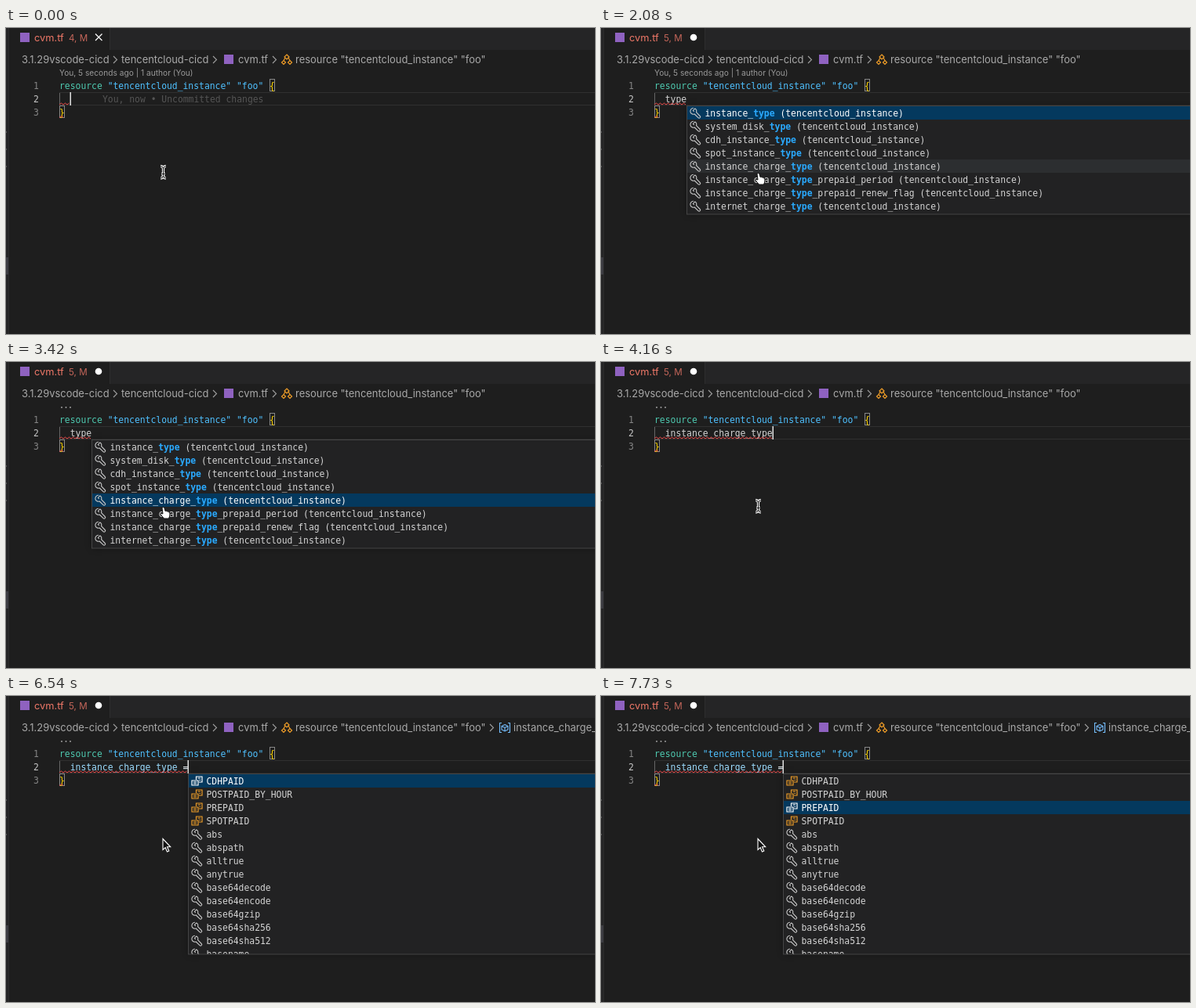
An HTML page with a canvas that plays this animation: 751x391 px, repeating every 8 s.

```html
<!DOCTYPE html>
<html lang="en">
<head>
<meta charset="utf-8">
<title>Editor completion</title>
<style>
  html, body { margin: 0; width: 100%; height: 100%; overflow: hidden; background: #1e1e1e; }
  canvas { display: block; }
</style>
</head>
<body>
<canvas width="751" height="391"></canvas>
<script>
const ctx = document.querySelector('canvas').getContext('2d');
const LOOP = 8000, LEFT = 68, CHAR = 6.85, ROW = 17;
const MONO = '11.38px "DejaVu Sans Mono", monospace';
const UI = 'Inter, sans-serif';
const ORANGE = '#ee9d28', RED = '#f14c4c', PURPLE = '#8f62c0';

const attributes = [
  'instance_type', 'system_disk_type', 'cdh_instance_type', 'spot_instance_type',
  'instance_charge_type', 'instance_charge_type_prepaid_period',
  'instance_charge_type_prepaid_renew_flag', 'internet_charge_type'
];
const broadAttributes = ['tags', ...attributes, 'allocate_public_ip', 'availability_zone',
  'data_disks', 'disable_monitor_service', 'security_groups'];
const values = ['CDHPAID', 'POSTPAID_BY_HOUR', 'PREPAID', 'SPOTPAID', 'abs', 'abspath', 'alltrue',
  'anytrue', 'base64decode', 'base64encode', 'base64gzip', 'base64sha256', 'base64sha512', 'basename'];

// Each entry lists only what changes at that moment.
const timeline = [
  [0, { text: '', caret: true, dirty: false, errors: 4, blame: true, lens: true,
        list: null, selected: 0, mouse: 'beam', fieldCrumb: false }],
  [600, { text: 't', dirty: true, blame: false }],
  [750, { list: broadAttributes }],
  [890, { text: 'ty', list: attributes, errors: 5 }],
  [1040, { mouse: 'hand' }],
  [1340, { text: 'typ' }],
  [1480, { text: 'type' }],
  [2080, { caret: false }],
  [2380, { lens: false }],
  [2530, { caret: true }],
  [2680, { selected: 1 }],
  [2980, { selected: 2, caret: false }],
  [3120, { selected: 3 }],
  [3420, { selected: 4 }],
  [3560, { caret: true }],
  [4010, { text: 'instance_charge_type', list: null, selected: 0 }],
  [4160, { mouse: 'beam' }],
  [4610, { text: 'instance_charge_type ' }],
  [5060, { caret: false }],
  [5500, { text: 'instance_charge_type =', caret: true }],
  [5650, { list: values, mouse: 'arrow' }],
  [6100, { fieldCrumb: true, caret: false }],
  [6540, { caret: true }],
  [6690, { selected: 1 }],
  [6840, { selected: 2 }],
  [6990, { caret: false }],
  [7140, { selected: 3 }],
  [7590, { caret: true }],
  [7730, { selected: 2 }]
];
const stateAt = time => Object.assign({}, ...timeline.filter(([t]) => t <= time).map(([, s]) => s));

function rect(x, y, w, h, color) {
  ctx.fillStyle = color;
  ctx.fillRect(x, y, w, h);
}
function label(text, x, y, color, font = MONO) {
  ctx.font = font;
  ctx.fillStyle = color;
  ctx.fillText(text, x, y);
}
function stroke(path, color, width = 1) {
  ctx.strokeStyle = color;
  ctx.lineWidth = width;
  ctx.stroke(new Path2D(path));
}
function at(x, y, draw) {
  ctx.save();
  ctx.translate(x, y);
  draw();
  ctx.restore();
}
function dot(x, y, r, color) {
  ctx.fillStyle = color;
  ctx.beginPath();
  ctx.arc(x, y, r, 0, 2 * Math.PI);
  ctx.fill();
}

function squiggle(from, to, y) {
  let path = `M${from} ${y}`;
  for (let x = from + 2.5, up = true; x <= to; x += 2.5, up = !up) path += `L${x} ${up ? y - 2 : y}`;
  stroke(path, RED);
}
const chevron = x => stroke(`M${x - 2} 36l4.5 4.5l-4.5 4.5`, '#a0a0a0', 1.1);

function wrench(x, y) {
  at(x, y, () => stroke('M-2-6.2A4 4 0 0 0-6-1.2A4 4 0 0 0-.8 1.5L4 6.2A1.4 1.4 0 0 0 6.2 4' +
    'L1.5-.8A4 4 0 0 0-.2-5.6L-2.6-3.1L-1.2-1.5', '#c5c5c5', 1.1));
}
function enumIcon(x, y, color) {
  at(x, y, () => stroke('M-1-1.5V-5.5H6.5V1.5H2.5M1-3.5H4.5M3-1H4.5M-6.5-.5H1.5V5.5H-6.5Z' +
    'M-4.5 1.5H-.5M-4.5 3.5H-.5', color, 1.2));
}
function classIcon(x, y) {
  at(x, y, () => stroke('M0-6.5L3-3.5L0-.5L-3-3.5ZM-4 1L-1.5 3.5L-4 6L-6.5 3.5Z' +
    'M4 1L6.5 3.5L4 6L1.5 3.5ZM-2-2.5L-4 1M2-2.5L4 1', ORANGE, 1.2));
}
function fieldIcon(x, y) {
  at(x, y, () => stroke('M-4-6H-6.5V6H-4M4-6H6.5V6H4M0-4L4-2V2.5L0 4.5L-4 2.5V-2ZM-4-2L0 0L4-2M0 0V4.5',
    '#75beff', 1.1));
}

const mice = {
  beam() {
    const shape = 'M197 176.5Q200.5 176.5 200.5 180V188.5Q200.5 192 197 192' +
      'M204 176.5Q200.5 176.5 200.5 180M200.5 188.5Q200.5 192 204 192M198 186.5H203';
    stroke(shape, '#fff', 3.2);
    stroke(shape, '#111', 1);
  },
  hand() {
    const shape = new Path2D('M199 186.5Q200.5 184.5 202 186.5L203 190.5Q204.5 189.5 205.2 191Q207 190 207.5 192' +
      'Q209 191.5 209 194Q209 197 207.5 200H201.5Q199 197 197 194.5Q197 192.5 200 194Z');
    ctx.fillStyle = '#fff';
    ctx.fill(shape);
    stroke(shape, '#111');
  },
  arrow() {
    const shape = new Path2D('M200 182.5V196.5L203.2 193.7L205.5 199L207.8 198L205.5 192.8H209.7Z');
    ctx.fillStyle = '#111';
    ctx.fill(shape);
    stroke(shape, '#fff', 1.1);
  }
};

function header(s) {
  rect(133, 0, 618, 28, '#252526');
  rect(132, 0, 1, 28, '#2d2d2d');
  rect(18, 6, 12, 12, PURPLE);
  label('cvm.tf', 36, 17, '#ef7868', `12.8px ${UI}`);
  label(`${s.errors}, M`, 80, 16.5, '#c5665a', `11.6px ${UI}`);
  if (s.dirty) dot(118, 12, 4.3, '#fff');
  else stroke('M114 7.5l8.5 8.5M122.5 7.5l-8.5 8.5', '#fff', 1.2);

  const crumb = (text, x) => label(text, x, 45, '#a9a9a9', `12.93px ${UI}`);
  crumb('3.1.29vscode-cicd', 20);
  crumb('tencentcloud-cicd', 147);
  crumb('cvm.tf', 296);
  crumb('resource "tencentcloud_instance" "foo"', 369);
  [139, 266, 342].forEach(chevron);
  rect(278, 34, 12, 12, PURPLE);
  classIcon(358, 40.5);
  if (s.fieldCrumb) {
    chevron(619);
    fieldIcon(636, 40.5);
    crumb('instance_charge_type', 647);
  }
}

function brace(char, x, y) {
  ctx.strokeStyle = '#888';
  ctx.lineWidth = 1;
  ctx.strokeRect(x + .5, y - 11.5, 6, 15);
  label(char, x, y + .5, '#ffd700');
}

function editor(s, caretX) {
  rect(0, 0, 3, 391, '#252526');
  rect(3, 0, 1, 391, '#2b2b2b');
  rect(0, 293, 3, 22, '#3c3c42');
  [132, 154, 176].forEach(y => rect(0, y, 1, 2, '#555'));

  if (s.lens) label('You, 5 seconds ago | 1 author (You)', LEFT, 61, '#999', `10.2px ${UI}`);
  else [71, 76.5, 82].forEach(x => dot(x, 58, .9, '#aaa'));

  rect(LEFT, 82, 683, 1, '#303030');
  rect(LEFT, 98, 683, 1, '#303030');
  rect(LEFT, 83, 1, 15, '#666');
  [1, 2, 3].forEach(n => label(n, 35, 60.5 + n * ROW, n === 2 ? '#c6c6c6' : '#858585'));

  label('resource', LEFT, 77.5, '#4ec9b0');
  label('"tencentcloud_instance" "foo"', LEFT + 9 * CHAR, 77.5, '#4fc1ff');
  brace('{', 336, 77);
  brace('}', LEFT, 111);
  squiggle(LEFT, LEFT + 7, 114.5);

  const assigned = s.text.endsWith('=');
  label(s.text, LEFT + 2 * CHAR, 94.5, assigned ? '#9cdcfe' : '#d4d4d4');
  if (assigned) label('=', caretX - CHAR, 94.5, '#d4d4d4');
  if (s.blame) label('You, now • Uncommitted changes', 123, 94.5, '#555');
  squiggle(LEFT, caretX, 98);
  if (s.caret) rect(Math.round(caretX) - .5, 82, 1.5, 17, '#e0e0e0');
}

function attributeRow(name, query, x, y, color) {
  const start = name.search(/(?<![a-z])t/);
  const from = Math.max(start, 0);
  const to = start < 0 ? 0 : start + query.length;
  label(name.slice(0, from), x, y, color);
  label(name.slice(from, to), x + from * CHAR, y, '#2aaaff', `bold ${MONO}`);
  label(name.slice(to) + ' (tencentcloud_instance)', x + to * CHAR, y, color);
}

function popup(s, caretX) {
  const left = Math.round(caretX) + .5, top = 99.5;
  const height = Math.min(s.list.length * ROW + 2.5, 230.5);
  ctx.save();
  ctx.shadowColor = 'rgba(0,0,0,.4)';
  ctx.shadowBlur = 8;
  rect(left, top, 700, height, '#222223');
  ctx.restore();

  ctx.save();
  ctx.beginPath();
  ctx.rect(left, top, 700, height);
  ctx.clip();
  s.list.forEach((name, i) => {
    const middle = 108.5 + i * ROW, active = i === s.selected;
    if (active) rect(left, middle - 8.5, 700, ROW, '#04395e');
    else if (i === 4 && s.mouse === 'hand') rect(left, middle - 8.5, 700, ROW, '#2c2e30');
    const color = active ? '#fff' : '#d4d4d4', x = left + 23;
    if (s.list === values && i < 4) enumIcon(left + 11, middle, active ? '#fff' : ORANGE);
    else wrench(left + 10.5, middle);
    if (s.list === values) label(name, x, middle + 4, color);
    else attributeRow(name, s.text, x, middle + 4, color);
  });
  ctx.restore();
  ctx.strokeStyle = '#454545';
  ctx.lineWidth = 1;
  ctx.strokeRect(left, top, 700, height);
}

function frame() {
  const s = stateAt(performance.now() % LOOP);
  const caretX = LEFT + (2 + s.text.length) * CHAR;
  rect(0, 0, 751, 391, '#1e1e1e');
  header(s);
  editor(s, caretX);
  if (s.list) popup(s, caretX);
  mice[s.mouse]();
  requestAnimationFrame(frame);
}
requestAnimationFrame(frame);
</script>
</body>
</html>
```
